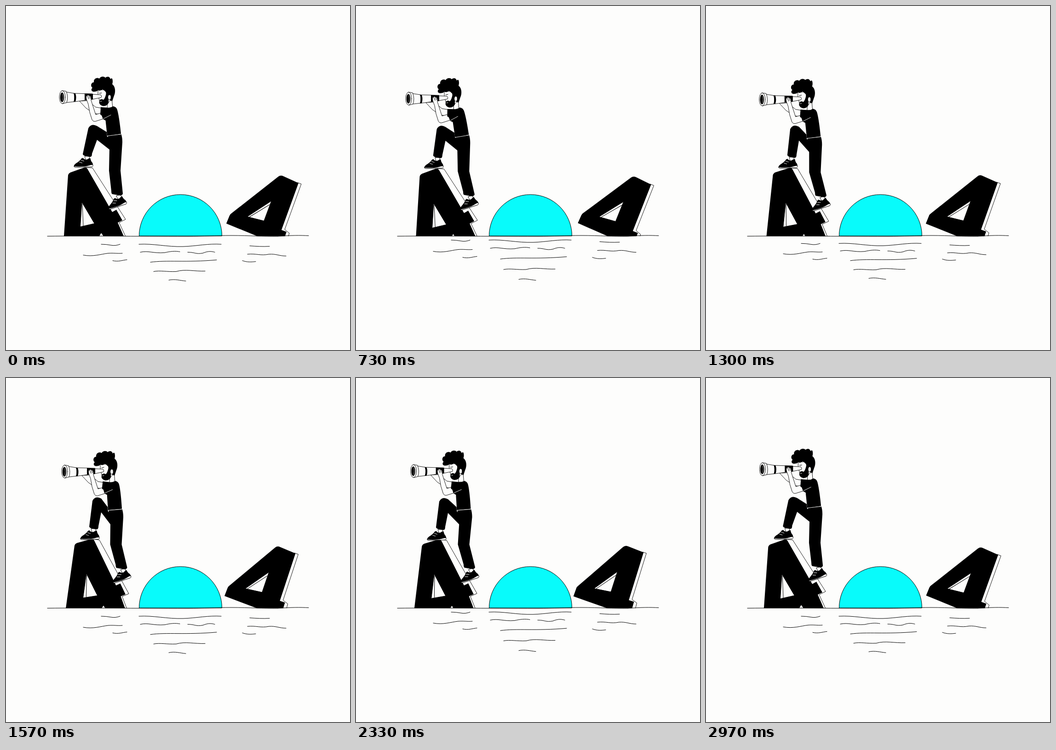
Animation of 748x748 px, one loop 3.01 s. Source, as an HTML page:

```html
<!DOCTYPE html>
<html lang="en">
<head>
<meta charset="utf-8">
<title>404</title>
<style>
  html, body { margin: 0; width: 100%; height: 100%; overflow: hidden; background: #fdfdfc; }
  svg { display: block; width: 100vw; height: 100vh; }
  .o { fill: #fdfdfc; stroke: #000; stroke-width: .9; stroke-linejoin: round; stroke-linecap: round; }
  .n { fill: none; stroke: #000; stroke-width: 1; stroke-linecap: round; }
  .w { fill: none; stroke: #fdfdfc; stroke-width: .9; stroke-linecap: round; }
</style>
</head>
<body>
<svg viewBox="0 0 748 748">
  <defs>
    <clipPath id="air"><path d="M0 0H748V500.5H0z"/></clipPath>
    <!-- origin at the bottom of the heel -->
    <g id="shoe">
      <path class="o" d="M-17-23L-15-14L-7-13L-7-23z"/>
      <path d="M-41-2C-41-9-31-9-24-19L-21-20Q-15-13-9-18L-5-19Q-4-12-1-9Q1-5 0-2z"/>
      <path class="o" d="M-41-2.500Q-20 0-10-3Q-4-5 0-4.500Q1-1-2 0H-38Q-41 0-41-2.500z"/>
      <path class="w" d="M-25-15l6 2M-29-11l6 2"/>
    </g>
  </defs>

  <path d="M289.5 500A90 90 0 0 1 469.500 500z" fill="#08fbfb" stroke="#000"/>

  <g clip-path="url(#air)">
    <g id="four1">
      <path class="o" d="M174 351L188 352L260 464L246 471L266 514H230L170 380z"/>
      <path d="M135 368Q136 364 140 362L168 352Q174 349 177 354L231 448L240 443L253 466L243 471L262 514H125z"/>
      <path class="o" d="M165 427L161.500 480L192 473z"/>
      <path class="n" d="M166 430L168 478"/>
      <path class="o" d="M200 504L207 493L215 504z"/>
    </g>
    <g id="four2">
      <path class="o" d="M634 384L642 387L606 486L616 494L610 514L590 500z"/>
      <path d="M479 473L486 456Q487 453 490 451L592 371Q597 367 603 370L636 385L599 487L610 491L602 515H585L545 500z"/>
      <path class="o" d="M525 458L577 424L561 467z"/>
      <path class="n" d="M529 459L573 432"/>
    </g>
  </g>
  <path class="n" d="M90 500.500C180 499.500 280 501 395 501C430 501 455 499 490 499C530 499 560 501.500 590 501C620 498.500 640 498.500 658 499.500"/>
  <g id="water" class="n"></g>

  <use href="#shoe" id="foot2"/>
  <path id="leg2"/>
  <use href="#shoe" id="foot1"/>
  <path id="leg1"/>

  <g id="head">
    <path class="o" d="M160 207L174 222L190 233L208 237V222L195 220L178 206z"/>
    <path class="o" d="M221 204L220 222H232L230 200z"/>
    <!-- face, hair, beard -->
    <path class="o" d="M200 183L200 192L203 205L204 212L218 214L229 204V182z"/>
    <path d="M194 186C187 188 183 182 188 178C183 174 185 166 191 166C190 158 198 154 203 158C205 153 213 152 216 156C221 152 226 154 227 159Q229 156 231 158Q233 164 231 170C239 176 238 189 235 195L231 207L226 205L219 196L217 187Q213 183 210 181Q205 186 200 183Q198 186 194 186z"/>
    <path d="M218 189L223 203L223 211Q219 218 211 217.500Q204 216 202.500 210L204 204Q208 201 212 204Q216 200 218 189z"/>
    <path class="w" d="M205 207.500l3-.5"/>
    <path class="n" d="M203 190l5-1"/>
    <ellipse class="o" cx="225" cy="198.500" rx="3.300" ry="5.500"/>
    <!-- telescope -->
    <path class="o" d="M186 192L206 193Q209 196 207 199L187 203z"/>
    <path class="o" d="M150 190L188 191V203L150 208z"/>
    <path d="M171 190.500L189 191V203L171 205z"/>
    <path class="o" d="M130 187L149 190V208L131 210z"/>
    <path d="M147 189.500L151 190Q154 199 151 208L147 208.500Q150 199 147 189.500z"/>
    <path class="o" d="M122 184L131 185.500Q136 198 132 210L123 212.500z"/>
    <ellipse class="o" cx="122.500" cy="198.200" rx="6.500" ry="14"/>
    <ellipse cx="122" cy="198.500" rx="4.300" ry="10.500"/>
    <path class="w" d="M123 191Q125.500 198 123 206" opacity=".6"/>
    <!-- near arm and hand -->
    <path class="o" d="M175 203Q173 196 177 194Q180 193 182 195Q186 198 185 205L195 236L216 230V244L197 250Q190 253 187 247Q181 232 179 214z"/>
    <path class="n" d="M177 195l3 7M180 194l3 7"/>
  </g>
  <g id="torso">
    <path d="M206 220L221 221Q227 222 233 218Q240 219 242 226Q246 240 250 278L220 282L216.500 249L211 246L208 238L205 236z"/>
    <path class="w" d="M212 245L228 237"/>
    <path class="w" d="M220 282.500L250 279"/>
  </g>
</svg>

<script>
const LOOP = 3010;
const times = [0, 430, 1030, 1570, 1930, 2330];
// offsets [dx, dy, turn] from the starting pose at times[1..5]
const moves = {
  four1: [[2, 1, -.5], [6, 3, .3], [7, 5, 4], [5, 5, 4.5], [3, 4.5, 3]],
  torso: [[-4.5, 0, -2.5], [-3.5, 4, -1.9], [2, 6.5, 2.3], [1.5, 6.5, 2.4], [-.5, 6.5, 2.5]],
  head: [[-8, 2], [-5.5, 4.2], [5, 5.2], [5, 4.8], [2.6, 4.2]],
  knee1: [[-4, 1.5], [-1, 2], [9, 1], [8, 1], [2, 2.5]],
  foot1: [[-2, 2], [5, 3], [14, 1], [13, 1.5], [7, 2.5]],
  knee2: [[-2.5, 0], [-2, 3], [2.5, 4], [1, 4], [-2.5, 4]],
  foot2: [[2, .5], [6, 3], [9.5, 4], [8.5, 4], [5, 3.5]]
};

// ripples: mean height and shape around it
const ripples = [
  [514.5, 'M207 -1Q218 -1 228 1T248 -1'],
  [514.5, 'M289 -1C320 -3 350 5 385 4C415 3 440 -3 468 -1'],
  [518, 'M530 -1C545 0 558 1 573 0'],
  [531, 'M292 0C310 -4 320 3 345 1C358 -2 368 -3 378 -1'],
  [531, 'M395 0C412 0 412 5 428 2C440 -3 447 -2 454 0'],
  [537.5, 'M168 0C190 4 205 -2 222 -4C235 -5 242 -3 253 -4'],
  [537.5, 'M525 -2C545 -4 553 2 572 -2C588 -3 594 2 609 2'],
  [550, 'M232 0C245 3 252 -1 263 -2'],
  [551, 'M514 -1C525 3 534 2 543 1'],
  [552.5, 'M314 1C350 -4 390 2 458 -4'],
  [575, 'M321 0C335 -3 350 1 370 0C390 -6 410 0 433 -1'],
  [595, 'M354 0C368 -3 378 1 391 2']
];

const $ = id => document.getElementById(id);
const set = (id, name, value) => $(id).setAttribute(name, value);

const waves = ripples.map(([y, d]) => {
  const path = document.createElementNS('http://www.w3.org/2000/svg', 'path');
  path.setAttribute('d', d);
  $('water').append(path);
  return { y, path };
});

// smooth periodic curve through the poses
function pose(part, t) {
  const keys = [moves[part][0].map(() => 0), ...moves[part]], n = keys.length;
  const at = i => times[(i + n) % n] + LOOP * Math.floor(i / n);
  const val = (i, c) => keys[(i + n) % n][c];
  const slope = (i, c) => (val(i + 1, c) - val(i - 1, c)) / (at(i + 1) - at(i - 1));
  let i = n - 1;
  while (times[i] > t) i--;
  const span = at(i + 1) - at(i), u = (t - at(i)) / span, v = 1 - u;
  return keys[0].map((_, c) =>
    v * v * (1 + 2 * u) * val(i, c) + u * u * (3 - 2 * u) * val(i + 1, c) +
    u * v * span * (v * slope(i, c) - u * slope(i + 1, c)));
}

function draw(t) {
  const p = {};
  for (const part in moves) p[part] = pose(part, t);
  const move = (id, [x, y, turn = 0], cx = 0, cy = 0) =>
    set(id, 'transform', `translate(${x} ${y}) rotate(${turn} ${cx} ${cy})`);
  const by = part => (x, y) => `${x + p[part][0]} ${y + p[part][1]} `;
  const hip = by('torso'), k1 = by('knee1'), f1 = by('foot1'), k2 = by('knee2'), f2 = by('foot2');

  move('four1', p.four1, 260, 464);
  move('torso', p.torso, 250, 278);
  move('head', p.head);
  move('foot1', [189 + p.foot1[0], 349.5 + p.foot1[1], -2]);
  move('foot2', [263 + p.foot2[0], 430 + p.foot2[1], -18]);

  const s = Math.sin(2 * Math.PI * (t + 150) / LOOP) - .31;
  move('four2', [5.2 * s, -1.5 * s, 2.3 * s], 479, 473);

  set('leg1', 'd', 'M' + hip(220, 284) + 'L' + hip(219, 274) + 'L' + k1(198, 261) +
    'Q' + k1(185, 254) + k1(179, 266) + 'L' + f1(167, 322) + 'Q' + f1(168, 327) + f1(184, 328) +
    'Q' + f1(187, 327) + f1(187, 321) + 'L' + k1(198, 291) + 'L' + hip(226, 313) + 'L' + hip(245, 300) + 'z');
  set('leg2', 'd', 'M' + hip(221, 281) + 'L' + hip(250.5, 278.5) + 'Q' + hip(253, 286) + hip(253, 296) +
    'L' + k2(249, 358) + 'L' + f2(254, 408) + 'Q' + f2(253, 412) + f2(248, 412) +
    'L' + f2(231, 409) + 'Q' + f2(229, 408) + f2(229, 402) + 'L' + k2(224, 358) + 'L' + hip(225, 308) + 'z');

  for (const { y, path } of waves) {
    const lag = (y - 510) * 3.8;
    const dy = 4.6 * Math.cos(4 * Math.PI * (t - lag) / LOOP);
    path.setAttribute('transform', `translate(0 ${y + dy})`);
  }
}

const start = performance.now();
function tick() {
  draw((performance.now() - start) % LOOP);
  requestAnimationFrame(tick);
}
tick();
</script>
</body>
</html>
```
